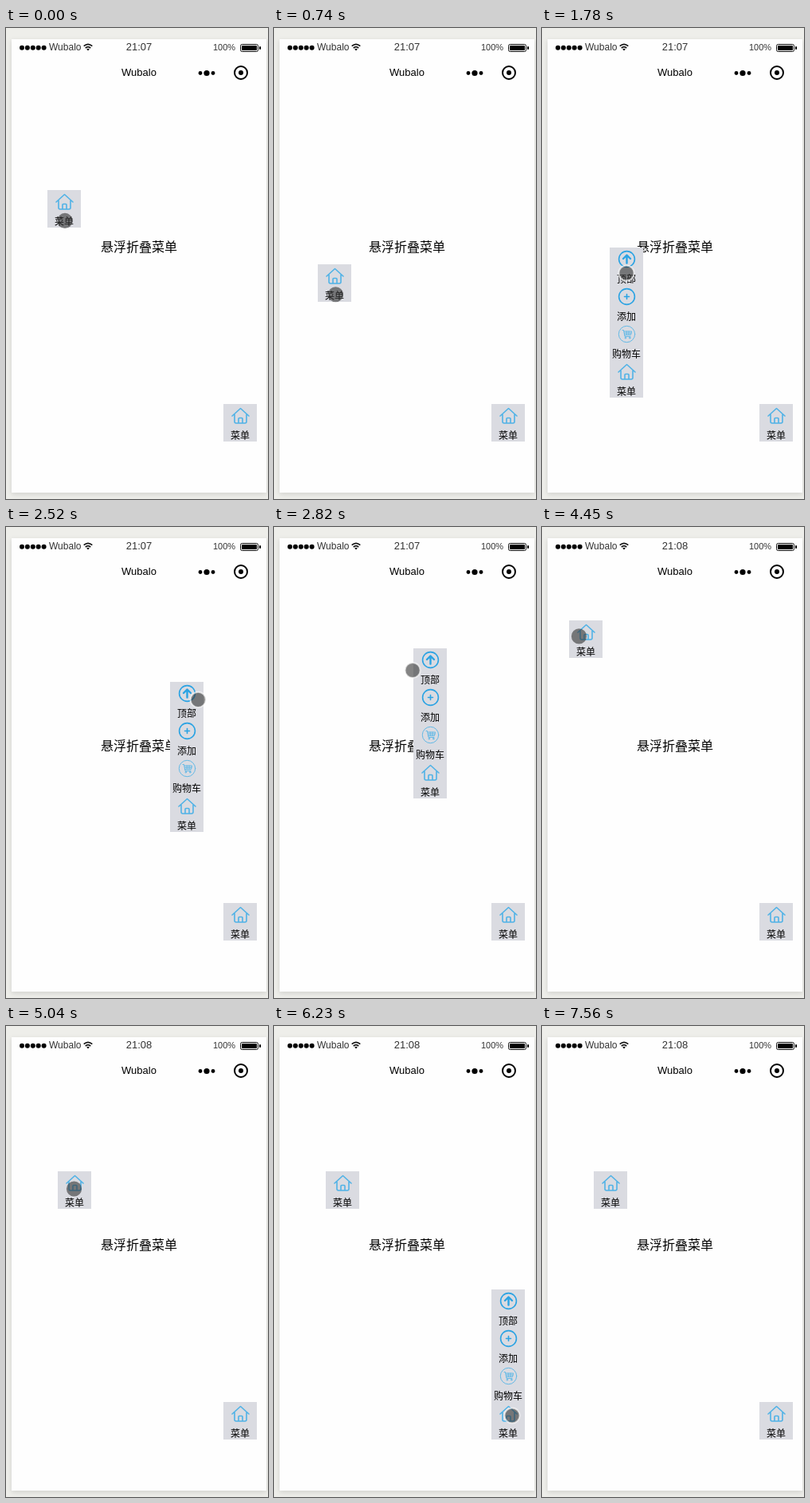
An HTML page for the animation above (8130 ms loop, 329 by 590 pixels).

```html
<!DOCTYPE html>
<html lang="zh">
<head>
<meta charset="utf-8">
<title>悬浮折叠菜单</title>
<style>
  html, body { margin: 0; width: 100%; height: 100%; overflow: hidden; background: #eeeeea; }
  svg { display: block; width: 329px; height: 590px; }
  text { font-family: "Liberation Sans", "Noto Sans CJK SC", "Noto Sans CJK", sans-serif; }
  .phone { fill: #fefefe; filter: drop-shadow(0 2px 3px rgba(0, 0, 0, .12)); }
  .mid { text-anchor: middle; }
  .label { font-size: 12px; text-anchor: middle; }
  .icon { fill: none; stroke: #2ba3e3; stroke-width: 1.6; stroke-linejoin: round; stroke-linecap: round; }
  .house { stroke: #4fb2e6; }
  .thin { stroke: #62b9e6; stroke-width: 1; }
</style>
</head>
<body>
<svg viewBox="0 0 329 590">
  <defs>
    <g id="house" class="icon house">
      <path d="M11 15 21.5 5.5 32 15M14 13V22Q14 24 16 24H27Q29 24 29 22V13M19 24V18.5Q19 17.5 20 17.5H23Q24 17.5 24 18.5V24"/>
    </g>
    <g id="top" class="icon">
      <circle cx="21.5" cy="14.5" r="9.9"/>
      <path stroke-width="2.4" d="M21.5 19.5V10M17 14 21.5 9.5 26 14"/>
    </g>
    <g id="add" class="icon">
      <circle cx="21.5" cy="14.5" r="9.9"/>
      <path d="M18.5 14.5H24.5M21.5 11.5V17.5"/>
    </g>
    <g id="cart" class="icon thin">
      <circle cx="21.5" cy="14.5" r="10.2"/>
      <path d="M16 9.5H17.5L19 17.5H26M18 11H27.5L26.5 15.5H18.8M18.4 13.2H27M21.2 11V15.5M24 11V15.5"/>
      <circle cx="19.8" cy="19.2" r=".8"/><circle cx="25.2" cy="19.2" r=".8"/>
    </g>
  </defs>

  <rect class="phone" x="7" y="14" width="320" height="568"/>

  <g id="dots"></g>
  <text x="54" y="28" font-size="12" fill="#333">Wubalo</text>
  <g fill="none" stroke="#111" stroke-width="1.7">
    <path d="M97.7 22.6Q103 18 108.3 22.6M99.8 25Q103 22.2 106.2 25"/>
    <path d="M103 28.4 101.2 26.4Q103 25 104.8 26.4Z" fill="#111" stroke="none"/>
  </g>
  <text id="clock" class="mid" x="167" y="28" font-size="13" fill="#333"></text>
  <text x="260" y="28" font-size="11" fill="#333">100%</text>
  <rect x="294.5" y="20.5" width="22" height="9" rx="2" fill="none" stroke="#111"/>
  <rect x="296" y="22" width="19" height="6" rx=".8"/>
  <rect x="318" y="23" width="2" height="4" rx="1"/>

  <text class="mid" x="167" y="60" font-size="13">Wubalo</text>
  <circle cx="244" cy="56.5" r="2.4"/><circle cx="252" cy="56.5" r="3.6"/><circle cx="260" cy="56.5" r="2.4"/>
  <circle cx="295" cy="56" r="8" fill="none" stroke="#000" stroke-width="2"/>
  <circle cx="295" cy="56" r="3"/>

  <text class="mid" x="167" y="280" font-size="16">悬浮折叠菜单</text>
  <g id="left"></g>
  <g id="right"></g>
  <circle id="cursor" r="9.6" fill="rgba(50,50,50,.6)" stroke="rgba(255,255,255,.65)"/>
</svg>
<script>
const LOOP = 8130, TICK = 148.25, ITEM = 47;
const $ = id => document.getElementById(id);

const house = ["house", "菜单"];
const items = [["top", "顶部"], ["add", "添加"], ["cart", "购物车"], house];

const between = (tick, from, to) => tick >= from && tick < to;

// A point that eases to each new place between two ticks and rests in between.
class Mover {
  constructor(x, y) { this.start = [x, y]; this.moves = []; }
  to(x, y, from, until) {
    this.moves.push({ goal: [x, y], from, until });
    return this;
  }
  at(tick) {
    return this.moves.reduce((point, { goal, from, until }) => {
      const k = Math.min(1, Math.max(0, (tick - from) / (until - from)));
      const eased = k * k * (3 - 2 * k);
      return point.map((v, i) => v + (goal[i] - v) * eased);
    }, this.start);
  }
}

const menu = new Mover(52, 203)
  .to(55, 296, 0, 5).to(85, 275, 5, 8)
  .to(249, 165, 15, 18).to(101, 138, 18, 20)
  .to(10, 110, 28, 31).to(65, 182, 32, 34);

// Where the cursor holds the menu.
const grip = new Mover(22, 38).to(21, 32, 5, 8).to(20.5, 22, 23, 24);

// The cursor's way once it has let go of the left menu.
const RELEASE = 35;
const free = new Mover(86, 204)
  .to(310, 488, RELEASE, 39).to(299, 488, 39, 42)
  .to(299, 508, 43, 45).to(315, 579, 49, 50);

// While dragging, the menu lags a little behind the cursor.
function cursorAt(tick) {
  if (tick >= RELEASE) return free.at(tick);
  const [x, y] = menu.at(tick + 0.2), [dx, dy] = grip.at(tick);
  return [x + dx, y + dy];
}

const menuMarkup = list =>
  `<rect width="42" height="${list.length * ITEM}" fill="#dadbe1"/>` +
  list.map(([icon, label], i) =>
    `<g transform="translate(0 ${i * ITEM})"><use href="#${icon}"/>` +
    `<text class="label" x="21" y="43.5">${label}</text></g>`).join("");

const closedMenu = menuMarkup([house]), openMenu = menuMarkup(items);

function drawMenu(node, open, [x, y]) {
  if (node.open !== open) {
    node.open = open;
    node.innerHTML = open ? openMenu : closedMenu;
  }
  node.setAttribute("transform", `translate(${Math.round(x)} ${Math.round(y)})`);
}

function draw(tick) {
  drawMenu($("left"), between(tick, 12, 27), menu.at(tick));
  const rightOpen = between(tick, 40, 47);
  drawMenu($("right"), rightOpen, [273, rightOpen ? 471 - 3 * ITEM : 471]);
  $("clock").textContent = tick < 30 ? "21:07" : "21:08";

  const cursor = $("cursor"), [x, y] = cursorAt(tick);
  const pressed = tick < 9 || between(tick, 28, 36);
  cursor.setAttribute("cx", x);
  cursor.setAttribute("cy", y);
  cursor.setAttribute("stroke-width", pressed ? 0 : 2);
  cursor.setAttribute("visibility", tick < 51 ? "visible" : "hidden");
}

$("dots").innerHTML = [0, 1, 2, 3, 4]
  .map(i => `<circle cx="${20 + i * 6.9}" cy="24.7" r="3"/>`).join("");

// The screen refreshes once per tick.
const start = performance.now();
function frame() {
  const time = (performance.now() - start) % LOOP;
  draw(Math.floor(time / TICK + 0.02));
  requestAnimationFrame(frame);
}
frame();
</script>
</body>
</html>
```
